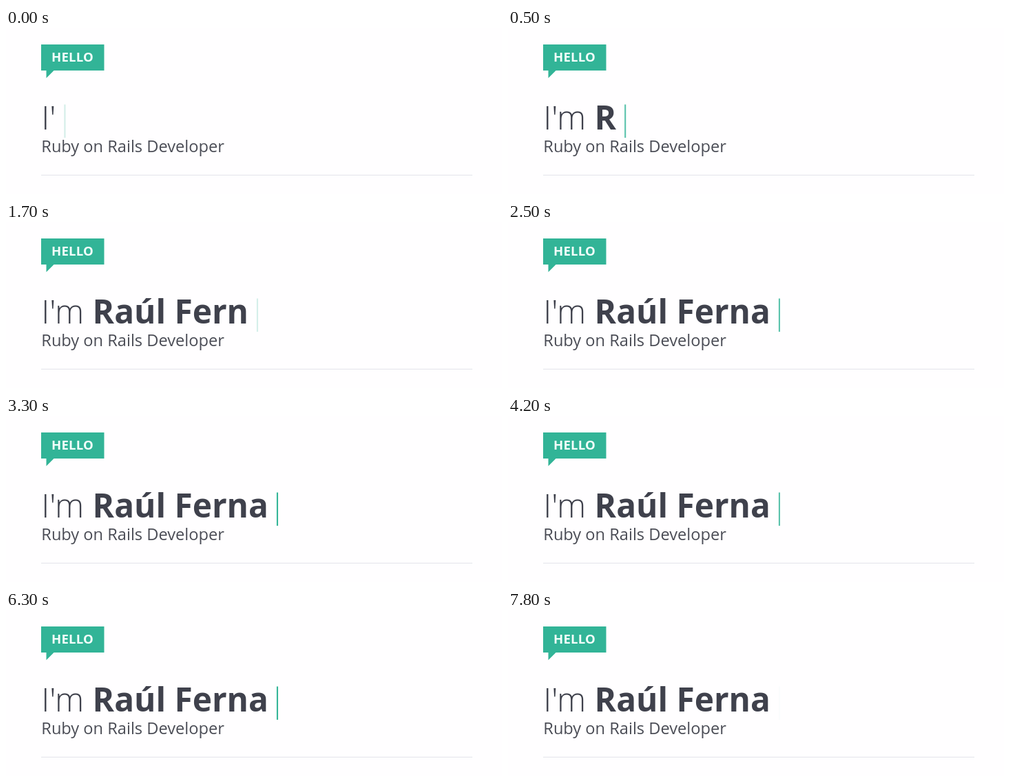
Animation, 720 px wide and 242 px high, one loop 8000 ms. Source, as an HTML page:

```html
<!DOCTYPE html>
<html lang="en">
<head>
<meta charset="utf-8">
<title>Hello</title>
<style>
  html, body { margin: 0; width: 100%; height: 100%; overflow: hidden; background: #fffeff; }
  svg { display: block; }
  text { font-family: "Open Sans", "Noto Sans", sans-serif; white-space: pre; }
  .badge { fill: #32b497; }
  .hello { font-size: 18.6px; font-weight: 700; letter-spacing: 0.2px; fill: #f4fffc; }
  .title { font-size: 47.8px; fill: #3f414c; }
  .light { font-weight: 300; }
  .bold { font-weight: 700; }
  .cursor { font-weight: 300; fill: #32b497; }
  .role { font-size: 23.6px; fill: #4a4c55; }
</style>
</head>
<body>
<svg width="720" height="242" viewBox="0 0 720 242">
  <path class="badge" d="M51 24H142.5V62H69.5L58.5 73V62H51Z"/>
  <text class="hello" x="66" y="49">HELLO</text>
  <text class="title" x="51.2" y="148" xml:space="preserve"><tspan class="light" id="intro"></tspan><tspan class="bold" id="person"></tspan><tspan class="cursor" id="cursor">|</tspan></text>
  <text class="role" x="51.3" y="181">Ruby on Rails Developer</text>
  <rect x="51" y="214" width="626" height="1" fill="#e2e4ea"/>
</svg>
<script>
const LOOP = 8000;
const INTRO = "I'm ";
const NAME = "Raúl Ferna";
// Time in ms at which each further character is typed
const KEYS = [150, 300, 480, 650, 780, 900, 1100, 1250, 1400, 1550, 1680, 1950];
const TYPED = 2;
const BLINK = 1000;
const DARK = 850; // moment in each blink when the cursor is invisible

const byId = id => document.getElementById(id);
const intro = byId("intro"), person = byId("person"), cursor = byId("cursor");

function type(count) {
  intro.textContent = INTRO.slice(0, count);
  person.textContent = NAME.slice(0, Math.max(0, count - INTRO.length));
}

function draw(t) {
  type(TYPED + KEYS.filter(key => key <= t).length);
  const phase = (t - DARK) / BLINK * 2 * Math.PI;
  cursor.setAttribute("fill-opacity", ((1 - Math.cos(phase)) / 2).toFixed(3));
}

const start = performance.now();
function tick() {
  draw((performance.now() - start) % LOOP);
  requestAnimationFrame(tick);
}
tick();
</script>
</body>
</html>
```
